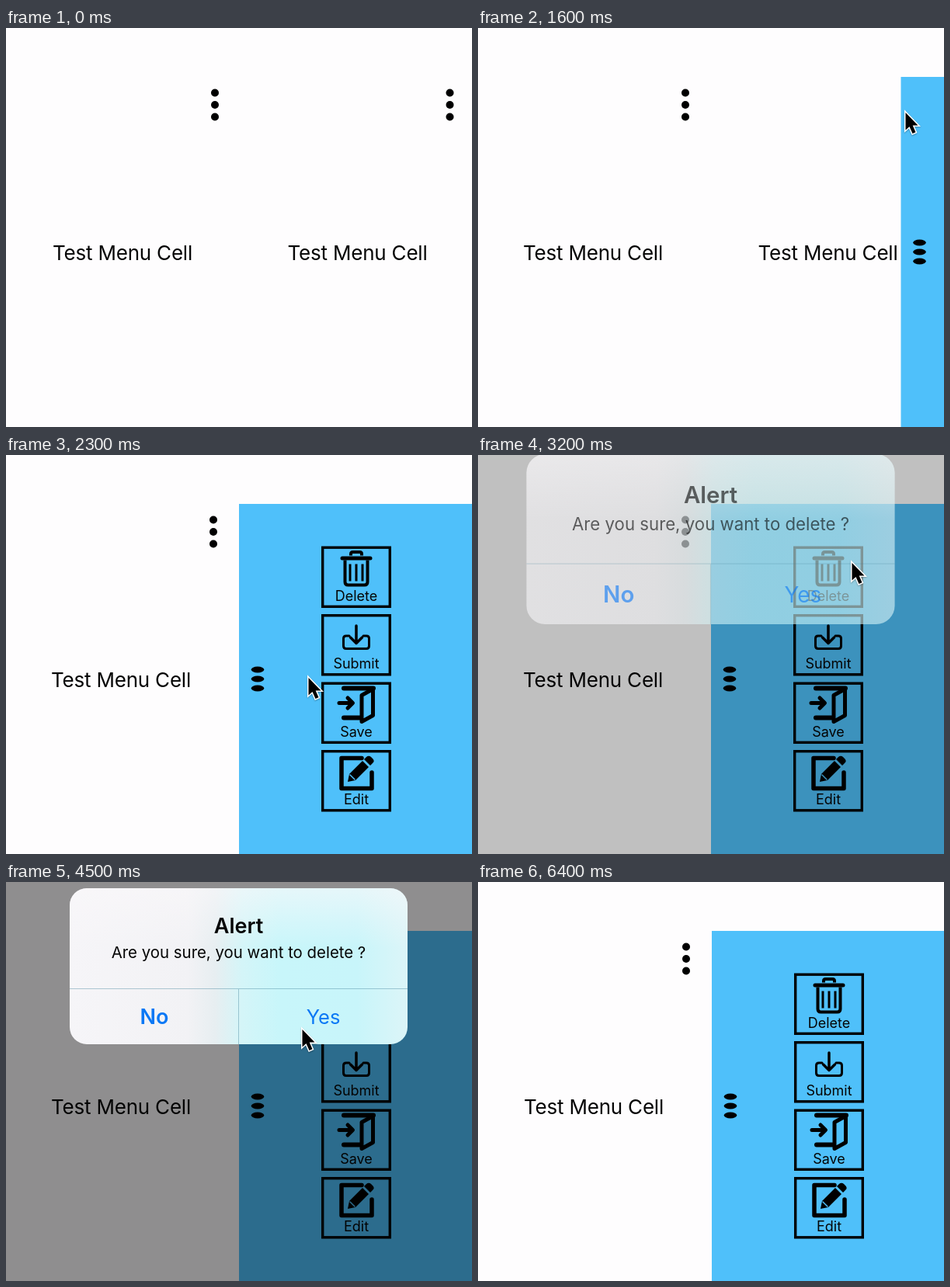
An HTML page with a canvas for the animation above (6500 ms loop, 600 px wide and 514 px high).

```html
<!DOCTYPE html>
<html lang="en">
<head>
<meta charset="utf-8">
<title>Menu cell</title>
<style>
  html, body { margin: 0; width: 100%; height: 100%; overflow: hidden; background: #fefdfe; }
  canvas { display: block; }
</style>
</head>
<body>
<canvas id="stage" width="600" height="514"></canvas>
<script>
const ctx = document.getElementById('stage').getContext('2d');
const LOOP = 6500, STEP = 100;

// [time, x, y] of the pointer's top left corner
const POINTER = [
  [400, 441, 2], [1000, 559, 109], [1100, 567, 109], [1400, 567, 109],
  [1600, 549, 107], [2000, 534, 125], [2300, 388, 285], [2700, 480, 137],
  [3500, 480, 137], [4200, 380, 188], [6000, 380, 188]
];

function ease(t, from, to) {
  const u = Math.min(1, Math.max(0, (t - from) / (to - from)));
  return u * u * (3 - 2 * u);
}

function text(str, x, y, size, { color = '#050505', weight = 400, spacing = 0 } = {}) {
  ctx.font = `${weight} ${size}px Inter, "Open Sans", sans-serif`;
  ctx.letterSpacing = spacing + 'px';
  ctx.textAlign = 'center';
  ctx.fillStyle = color;
  ctx.fillText(str, x, y);
}

function ellipses(x, ys, rx, ry) {
  ctx.fillStyle = '#000';
  for (const y of ys) {
    ctx.beginPath();
    ctx.ellipse(x, y, rx, ry, 0, 0, 2 * Math.PI);
    ctx.fill();
  }
}

function stroke(path, width, cap = 'round') {
  ctx.strokeStyle = '#000';
  ctx.lineWidth = width;
  ctx.lineCap = cap;
  ctx.lineJoin = 'round';
  ctx.stroke(new Path2D(path));
}

function fill(path, color = '#000') {
  ctx.fillStyle = color;
  ctx.fill(new Path2D(path));
}

// Icons are drawn relative to the top left corner of their button.
const BUTTONS = [
  ['Delete', () => {
    stroke('M38 12V10Q38 7.5 40.5 7.5H49.5Q52 7.5 52 10V12', 4, 'butt');
    stroke('M27 15.5H63', 5);
    stroke('M30.5 18V46Q30.5 50 34.5 50H55.5Q59.5 50 59.5 46V18', 4, 'butt');
    stroke('M37 23V45M45 23V45M53 23V45', 3, 'butt');
  }],
  ['Submit', () => {
    stroke('M36 28H32Q28.5 28 28.5 31.5V41Q28.5 44.5 32 44.5H58Q61.5 44.5 61.5 41V31.5Q61.5 28 58 28H54', 3);
    stroke('M45 15V37M37.5 30L45 37.5L52.5 30', 3.5);
  }],
  ['Save', () => {
    stroke('M29 8H67M29 46H51', 6);
    stroke('M52 17L66.5 9V43L52 51Z', 5);
    stroke('M23 27H39M34 20.5L40.5 27L34 33.5', 5);
  }],
  ['Edit', () => {
    stroke('M52 10.5H26V49.5H65V29', 5.5);
    fill('M34 41L36 31L53 14L61 22L44 39Z');
    fill('M55 12L58 9Q61 6.5 64 9L66.5 11.5Q69 14.5 66 17L63 20Z');
    ctx.strokeStyle = '#4fc0fa';
    ctx.lineWidth = 1.5;
    ctx.stroke(new Path2D('M37 32L43 38'));
  }]
];

function drawCell(x) {
  ellipses(x + 269, [83.5, 99, 114.5], 5, 5);
  text('Test Menu Cell', x + 150, 299, 26, { spacing: -0.2 });
}

function drawPanel(x) {
  ctx.fillStyle = '#4fc0fa';
  ctx.fillRect(x, 63, 302, 451);
  ellipses(x + 24, [276.5, 288.5, 300.5], 8.3, 4);
  BUTTONS.forEach(([label, drawIcon], i) => {
    ctx.save();
    ctx.translate(x + 106, 117.5 + 87.5 * i);
    ctx.strokeStyle = '#000';
    ctx.lineWidth = 3.4;
    ctx.lineJoin = 'miter';
    ctx.strokeRect(1.7, 1.7, 86.6, 76.1);
    drawIcon();
    text(label, 45, 70, 18);
    ctx.restore();
  });
}

function glass() {
  const g = ctx.createLinearGradient(82, 0, 517, 0);
  [[0, '#f6f5f8'], [0.35, '#f2f2f5'], [0.43, '#e7eef1'], [0.51, '#d4f5f8'],
   [0.62, '#c8f6fa'], [0.85, '#c8f5fa'], [1, '#dcf5f8']].forEach(s => g.addColorStop(...s));
  return g;
}

function topLight() {
  const g = ctx.createLinearGradient(0, 8, 0, 85);
  g.addColorStop(0, 'rgba(250,248,250,.6)');
  g.addColorStop(1, 'rgba(250,248,250,0)');
  return g;
}

function drawAlert(alpha, scale) {
  ctx.save();
  ctx.globalAlpha = alpha;
  ctx.translate(299.5, 108.5);
  ctx.scale(scale, scale);
  ctx.translate(-299.5, -108.5);
  ctx.beginPath();
  ctx.roundRect(82, 8, 435, 201, 22);
  for (const paint of [glass(), topLight()]) {
    ctx.fillStyle = paint;
    ctx.fill();
  }
  ctx.fillStyle = 'rgba(60,125,150,.4)';
  ctx.fillRect(82, 137, 435, 1);
  ctx.fillRect(299, 138, 1, 71);
  text('Alert', 299.5, 66, 27, { weight: 600 });
  text('Are you sure, you want to delete ?', 299.5, 98, 20.4);
  text('No', 191, 183, 27, { weight: 600, color: '#0a78f5' });
  text('Yes', 408.5, 183, 25.5, { color: '#0a78f5' });
  ctx.restore();
}

function drawPointer(t) {
  const next = POINTER.findIndex(key => key[0] > t);
  if (next < 1) return;
  const [t0, x0, y0] = POINTER[next - 1], [t1, x1, y1] = POINTER[next];
  const u = ease(t, t0, t1);
  ctx.save();
  ctx.translate(x0 + (x1 - x0) * u + 1.5, y0 + (y1 - y0) * u + 2);
  const arrow = new Path2D('M0 0V22.5L5 18L9 27L13 25.3L9.2 16.5H16Z');
  ctx.shadowColor = 'rgba(0,0,0,.3)';
  ctx.shadowBlur = 2;
  ctx.shadowOffsetY = 1;
  ctx.strokeStyle = '#fff';
  ctx.lineWidth = 3;
  ctx.lineJoin = 'miter';
  ctx.stroke(arrow);
  ctx.shadowColor = 'transparent';
  ctx.fillStyle = '#000';
  ctx.fill(arrow);
  ctx.restore();
}

function draw(t) {
  const shift = t < 100 ? 0 : -2 + Math.max(0, t - 6200) / 200;
  const open = ease(t, 1356, 2244);
  const appear = ease(t, 2880, 3480);
  const leave = ease(t, 4800, 5340);
  const shown = appear * (1 - leave);

  ctx.fillStyle = '#fefdfe';
  ctx.fillRect(0, 0, 600, 514);
  drawCell(shift);
  drawCell(shift + 302.5);
  if (open > 0) drawPanel(302 + shift + 300 * (1 - open));
  if (shown > 0) {
    ctx.fillStyle = `rgba(0,0,0,${0.44 * shown})`;
    ctx.fillRect(0, 0, 600, 514);
    drawAlert(Math.min(1, shown * 1.1), 1.2 - 0.2 * appear);
  }
  drawPointer(t);
}

const start = performance.now();
function tick() {
  const t = (performance.now() - start) % LOOP;
  draw(Math.floor(t / STEP) * STEP);
  requestAnimationFrame(tick);
}
tick();
</script>
</body>
</html>
```
